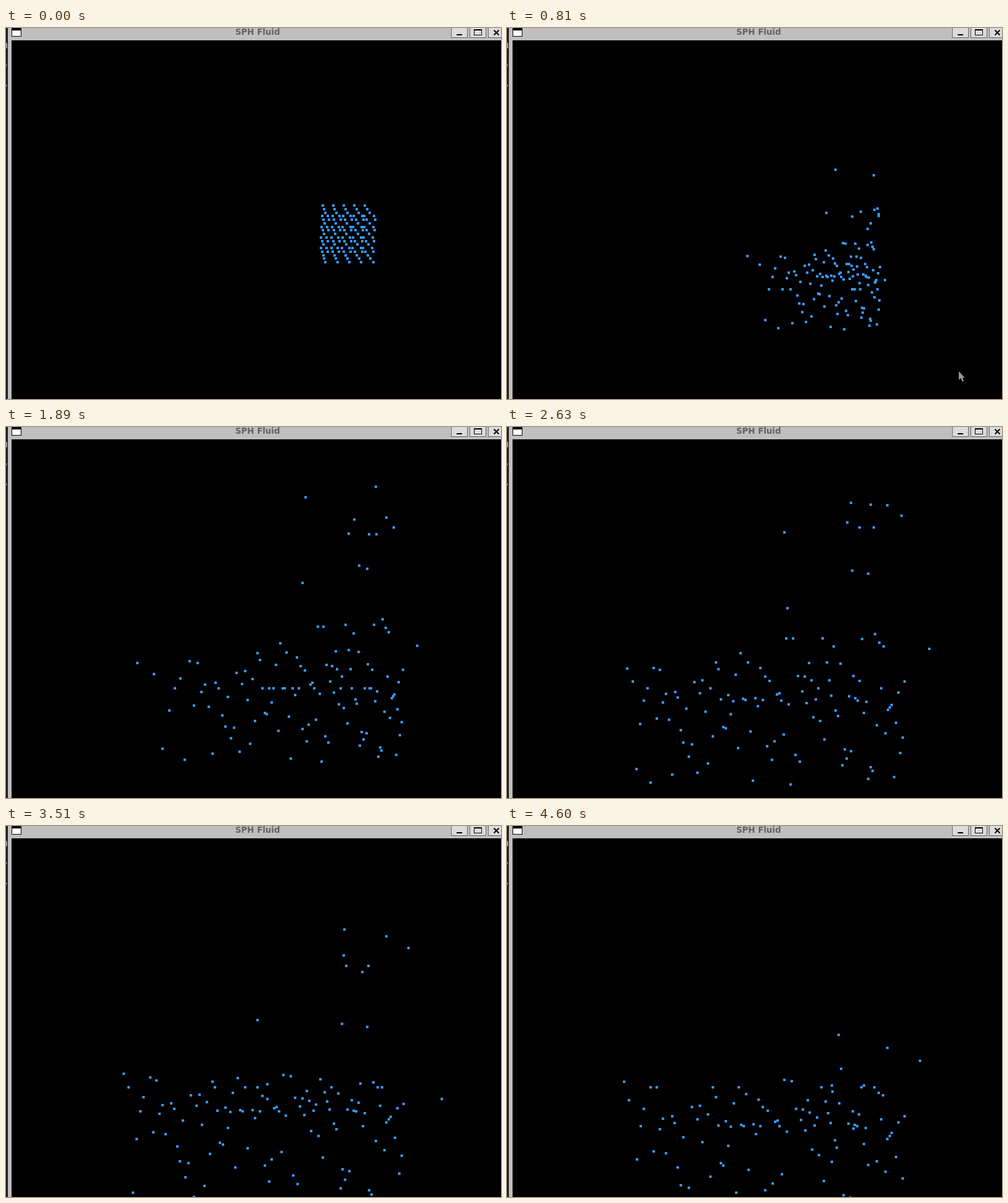
Write an HTML page with a canvas that moves like this. It is 803 px wide and 602 px high and loops after 4.66 s.

```html
<!DOCTYPE html>
<html lang="en">
<head>
<meta charset="utf-8">
<title>SPH Fluid</title>
<style>
  html, body { margin: 0; width: 100%; height: 100%; overflow: hidden; background: #000; }
  svg, canvas { position: absolute; left: 0; top: 0; display: block; }
</style>
</head>
<body>
<svg width="803" height="602" viewBox="0 0 803 602" shape-rendering="crispEdges">
  <rect width="803" height="602" fill="#000"/>
  <rect width="3" height="602" fill="#1c1c1c"/>
  <g font-family="'DejaVu Sans Mono', monospace" font-size="17" fill="#aaa">
    <text x="-7" y="33">a</text>
    <text x="-8" y="69">y</text>
    <text x="-8" y="102">y</text>
  </g>
  <path d="M3 0H803V20H9V602H3Z" fill="#bfbfbf"/>
  <path d="M9 0H25V14H9Z"/>
  <path d="M10 4H24V13H10Z" fill="#fff"/>
  <text x="372" y="11" font-family="'DejaVu Sans', sans-serif" font-weight="bold" font-size="13.33" fill="#626262">SPH Fluid</text>
  <g fill="#dcdcdc" stroke="#666">
    <path d="M722.5 -1V15.5H748.5V-1Z"/>
    <path d="M752.5 -1V15.5H778.5V-1Z"/>
    <path d="M782.5 -1V15.5H808V-1Z"/>
  </g>
  <path d="M731 10H740V12H731Z"/>
  <path d="M759 2H772V12H759ZM760 4V11H771V4Z" fill-rule="evenodd"/>
  <path d="M791.5 3.5L799.5 11.5M799.5 3.5L791.5 11.5" stroke="#000" stroke-width="2" shape-rendering="auto"/>
</svg>
<canvas id="view" width="803" height="602"></canvas>
<script>
const ctx = document.getElementById('view').getContext('2d');
const LOOP = 4660, STEP = 67.65, STEPS = 69;
const BURST = 810, LAUNCH = 1300;  // ms until the body and the thrown drops move freely
const FALL = 5.4e-5;               // half the gravity, px per ms²
const SURFACE = 424;

// Drops thrown high: x at its middle time, drift in px/s, time and height of the apex.
const THROWN = [
  [450, -48, 1550, 108],
  [590, -14, 1900, 97],
  [558, -10, 2600, 123],
  [552, -5, 2490, 154],
  [572, -23, 2400, 160],
  [595, -8, 2400, 160],
  [617, 0, 2520, 126],
  [640, 15, 2500, 143],
  [586, 0, 2150, 226],
  [560, -17, 2150, 221],
  [455, -35, 1750, 252],
  [685, 25, 2200, 350]
];
const POINTER = [[60, 377, -4], [540, 690, 446], [810, 733, 557], [900, 733, 604]];

let seed = 7;
const rand = () => (seed = (seed * 16807) % 2147483647) / 2147483647;
const lerp = (a, b, k) => a + (b - a) * k;
const smooth = (a, b, t) => {
  const k = Math.min(1, Math.max(0, (t - a) / (b - a)));
  return k * k * (3 - 2 * k);
};

// Slanted block: in every three rows, the first two are doubled, save at the ends.
function lattice() {
  const dots = [];
  for (let j = 0; j < 17; j++) {
    const phase = j > 14 ? j - 12 : j % 3;
    const x = 513.6 - 0.25 * j + 2.2 * phase, y = 288 + 5.75 * j;
    const doubled = j > 2 && j < 14 && phase < 2;
    for (let i = 0; i < 5; i++) {
      dots.push({ x: x + i * (17.1 + 0.55 * phase), y });
      if (doubled) dots.push({ x: x + 9 + i * 18.7, y });
    }
  }
  return dots;
}

function thrownAt([x, drift, apex, top], t) {
  return { x: x + drift * (t - 2630) / 1000, y: top + FALL * (t - apex) ** 2 };
}

// Body of fluid: spreads left, its right side rises and falls, the rest sinks.
// q is a drop's place from left to right, s from top (-1) to bottom (1).
function bodyAt({ q, s }, t) {
  const age = t - BURST;
  const left = 190 + 200 * Math.exp(-age / 500);
  const right = 645 - 40 * Math.exp(-age / 300);
  const bend = lerp(0.5, 0.85, smooth(1500, 2700, t));
  const roofLeft = 370 + 0.012 * age;
  const roofRight = Math.min(405, 262 + FALL * (t - 1900) ** 2);
  const middle = 404 + 0.022 * age;
  const bottom = 489 + 0.05 * age;
  const y = s < 0
    ? lerp(middle, lerp(roofLeft, roofRight, q), (-s) ** 1.7)
    : lerp(middle, bottom, s ** 1.3);
  return {
    x: lerp(left, right, q ** bend),
    y: Math.abs(y - SURFACE) < 5 ? SURFACE : y
  };
}

// Takes the dot nearest to a point out of the list.
function take(dots, p) {
  const gap = d => Math.hypot(d.x - p.x, d.y - p.y);
  const best = dots.reduce((a, b) => gap(b) < gap(a) ? b : a);
  return dots.splice(dots.indexOf(best), 1)[0];
}

function rank(dots, axis, noise, set) {
  dots.map(d => [d[axis] + rand() * noise, d])
    .sort((a, b) => a[0] - b[0])
    .forEach(([, d], i) => set(d, i / (dots.length - 1)));
}

const body = lattice();
const thrown = THROWN.map(path => ({ ...take(body, thrownAt(path, BURST)), path }));
rank(body, 'x', 14, (d, k) => d.q = k);
rank(body, 'y', 18, (d, k) => d.s = 2 * k - 1);

function drawDot(from, to, k) {
  ctx.fillRect(Math.round(lerp(from.x, to.x, k)) - 2, Math.round(lerp(from.y, to.y, k)) - 2, 4, 4);
}

function drawPointer(t) {
  const i = POINTER.findIndex((p, k) => k < POINTER.length - 1 && t >= p[0] && t < POINTER[k + 1][0]);
  if (i < 0) return;
  const a = POINTER[i], b = POINTER[i + 1], k = (t - a[0]) / (b[0] - a[0]);
  ctx.save();
  ctx.translate(Math.round(lerp(a[1], b[1], k)), Math.round(lerp(a[2], b[2], k)));
  ctx.fillStyle = '#929aa2';
  ctx.fill(new Path2D('M0 0V14L3 11L6 17L8 16L6 10.5H9.5Z'));
  ctx.restore();
}

function draw(t) {
  ctx.clearRect(0, 0, 803, 602);
  ctx.fillStyle = '#3399ff';
  const spread = Math.min(1, t / BURST) ** 1.6;
  for (const d of body) drawDot(d, bodyAt(d, Math.max(t, BURST)), spread);
  const rise = Math.min(1, t / LAUNCH) ** 2;
  for (const d of thrown) drawDot(d, thrownAt(d.path, t), rise);
  drawPointer(t);
}

const start = performance.now();
function tick() {
  const t = (performance.now() - start) % LOOP;
  const n = Math.min(STEPS - 1, Math.floor((t + 9.9) / STEP));
  draw(Math.floor(n * STEP / 10) * 10);
  requestAnimationFrame(tick);
}
tick();
</script>
</body>
</html>
```
